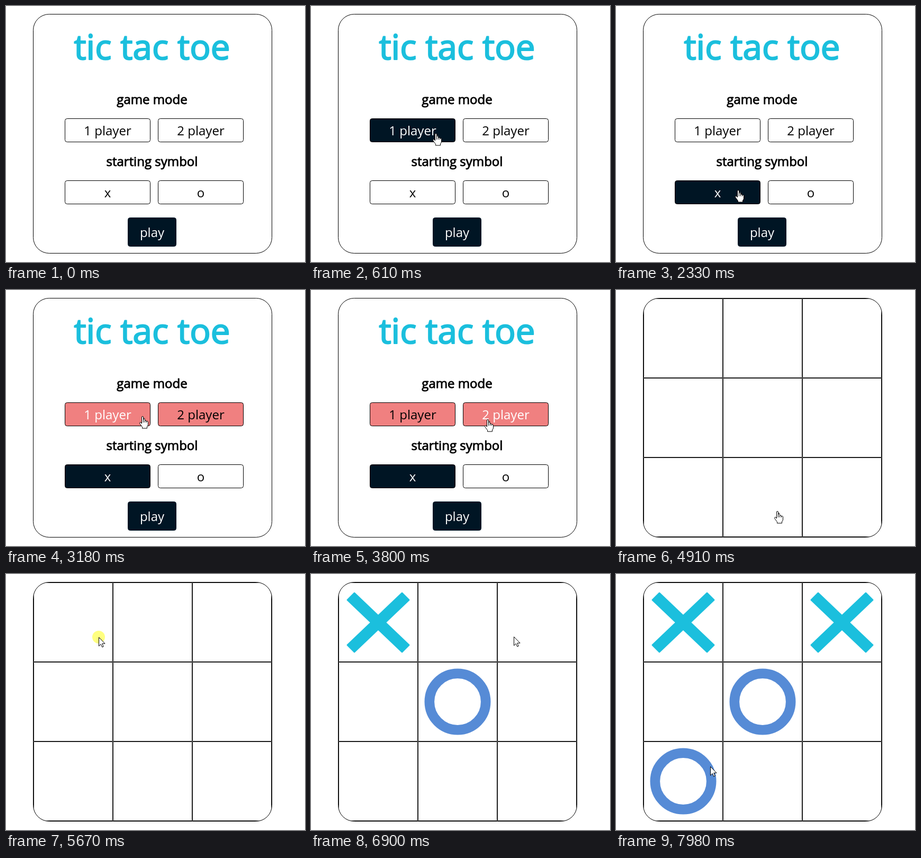
Write an HTML page with a canvas that moves like this. It is 565 px wide and 483 px high and loops after 8000 ms.

```html
<!DOCTYPE html>
<html lang="en">
<head>
<meta charset="utf-8">
<title>tic tac toe</title>
<style>
  html, body { margin: 0; width: 100%; height: 100%; overflow: hidden; background: #fff; }
  canvas { display: block; }
</style>
</head>
<body>
<canvas id="stage" width="565" height="483"></canvas>
<script>
const ctx = document.getElementById('stage').getContext('2d');
const LOOP = 8000, TICK = 76, PRESS = 150;
const CYAN = '#1bbfdd', BLUE = '#568bd6', DARK = '#001524', CORAL = '#f08080';
const FONT = '"Open Sans", sans-serif';
const LEFT = 52, TOP = 16, CELL = 150;

// Pointer script: each move leads on from the one before, some end in a click
const moves = [];
const move = (start, end, x, y) => moves.push({ start, end, x, y });
const click = (start, end, x, y) => {
  move(start, end, x, y);
  return end + PRESS;
};

move(0, 1, 545, 500);
move(150, 610, 236, 240);
const pickX = click(1540, 1860, 231, 347);
const refuse = click(2340, 2560, 290, 420);
move(refuse, 2950, 255, 267);
move(3020, 3180, 258, 238);
move(3250, 3880, 337, 244);
const pickTwo = 4200;
move(pickTwo, 4430, 337, 295);
const begin = click(4430, 4760, 305, 417);

// Turns alternate between X and O
const turns = [];
const turn = (cell, ...to) => turns.push({ cell, time: click(...to) });
turn(0, 5140, 5670, 175, 119);
turn(4, 5990, 6360, 280, 238);
move(6760, 6900, 378, 114);
turn(2, 6900, 7060, 396, 131);
turn(6, 7360, 7830, 178, 363);

const presses = [pickX, refuse, begin, ...turns.map(m => m.time)];

const option = (col, row) => [111 + 176 * col, 212 + 117 * row, 162, 45];
const buttons = {
  one: option(0, 0), two: option(1, 0),
  x: option(0, 1), o: option(1, 1),
  play: [230, 399, 92, 55]
};
const labels = [165, 281].map(y => [190, y, 172, 26]);

const inside = (p, [x, y, w, h]) => p.x >= x && p.x < x + w && p.y >= y && p.y < y + h;
const ease = k => k * k * (3 - 2 * k);

function pointerAt(t) {
  let i = moves.length - 1;
  while (i > 0 && moves[i].start > t) i--;
  const to = moves[i], from = moves[i - 1] || to;
  const span = to.end - to.start;
  const n = Math.max(1, Math.round(span / TICK));
  const step = Math.floor((t - to.start) / span * n + 0.01);
  const k = ease(Math.min(1, (step + 1) / (n + 1)));
  return {
    x: Math.round(from.x + (to.x - from.x) * k),
    y: Math.round(from.y + (to.y - from.y) * k)
  };
}

function roundRect(x, y, w, h, r) {
  ctx.beginPath();
  ctx.roundRect(x, y, w, h, r);
}

function text(str, x, y, size, color, bold = 0) {
  ctx.font = `400 ${size}px ${FONT}`;
  ctx.textAlign = 'center';
  ctx.fillStyle = ctx.strokeStyle = color;
  ctx.fillText(str, x, y);
  if (bold) {
    ctx.lineWidth = bold;
    ctx.lineJoin = 'round';
    ctx.strokeText(str, x, y);
  }
}

function button([x, y, w, h], str, fill, color, edge = '#000') {
  roundRect(x + 0.5, y + 0.5, w - 1, h - 1, 4);
  ctx.fillStyle = fill;
  ctx.fill();
  ctx.strokeStyle = edge;
  ctx.lineWidth = 1;
  ctx.stroke();
  text(str, x + w / 2, y + h / 2 + 9.5, 24, color);
}

function frame() {
  roundRect(LEFT - 0.5, TOP - 0.5, 3 * CELL + 1, 3 * CELL + 1, 30);
  ctx.strokeStyle = '#000';
  ctx.lineWidth = 1;
  ctx.stroke();
}

function drawMenu(t, p) {
  frame();
  text('tic tac toe', 276, 100.5, 65.5, CYAN, 2.2);
  text('game mode', 276, 185, 24, '#000', 0.9);
  text('starting symbol', 276, 302, 24, '#000', 0.9);

  const choice = (key, str, picked, error) => {
    const lit = picked || inside(p, buttons[key]);
    const fill = error && !picked ? CORAL : lit ? DARK : '#fff';
    button(buttons[key], str, fill, lit ? '#fff' : '#000');
  };
  const error = t >= refuse;
  choice('one', '1 player', false, error);
  choice('two', '2 player', t >= pickTwo, error);
  choice('x', 'x', t >= pickX, false);
  choice('o', 'o', false, false);

  const hot = inside(p, buttons.play);
  button(buttons.play, 'play', hot ? '#fff' : DARK, hot ? DARK : '#fff', DARK);
}

function drawX(cx, cy) {
  ctx.fillStyle = ctx.strokeStyle = CYAN;
  ctx.lineWidth = 3;
  ctx.lineJoin = 'round';
  for (const s of [1, -1]) {
    ctx.beginPath();
    ctx.moveTo(cx - s * 45, cy - 55.4);
    ctx.lineTo(cx + s * 58, cy + 42.5);
    ctx.lineTo(cx + s * 45, cy + 55.4);
    ctx.lineTo(cx - s * 58, cy - 42.5);
    ctx.closePath();
    ctx.fill();
    ctx.stroke();
  }
}

function drawO(cx, cy) {
  ctx.beginPath();
  ctx.arc(cx, cy, 53.2, 0, Math.PI * 2);
  ctx.strokeStyle = BLUE;
  ctx.lineWidth = 18.6;
  ctx.stroke();
}

function drawBoard(t) {
  const col = i => LEFT + (i % 3) * CELL;
  const row = i => TOP + Math.floor(i / 3) * CELL;
  ctx.save();
  roundRect(LEFT, TOP, 3 * CELL, 3 * CELL, 29.5);
  ctx.clip();
  ctx.strokeStyle = '#1c1c1c';
  ctx.lineWidth = 1;
  for (let i = 0; i < 9; i++) ctx.strokeRect(col(i) + 0.5, row(i) + 0.5, CELL - 1, CELL - 1);
  ctx.restore();
  frame();
  turns.forEach(({ cell, time }, i) => {
    if (t < time) return;
    const mark = i % 2 ? drawO : drawX;
    mark(col(cell) + CELL / 2, row(cell) + CELL / 2 + (i % 2 ? 0 : 0.5));
  });
}

const arrow = new Path2D('M.5.5V17L4.2 13.4L6.8 19L9.2 18L6.8 12.3H12Z');
const hand = new Path2D(
  'M-1.5 12V2Q-1.5.5 0 .5T1.5 2V8Q3-.5 4.5 7.5V9Q6 7 7.5 9V10Q10 8.5 10.5 11V16' +
  'Q10.5 18 8.5 20V23H-.5V20.5L-5 14.5Q-6 12.5-4.5 11.5Q-3 11-1.5 14Z');
const fingers = new Path2D('M1.5 8V12M4.5 8.5V12M7.5 9.5V12');
const beam = new Path2D('M-3.5-7.5H-1L0-6.5L1-7.5H3.5M-3.5 7.5H-1L0 6.5L1 7.5H3.5M0-6.5V6.5');

function drawPointer(t, p) {
  ctx.save();
  ctx.translate(p.x, p.y);
  ctx.lineJoin = 'round';
  const menu = t < begin + TICK;
  if (menu && labels.some(b => inside(p, b))) {
    ctx.strokeStyle = '#fff';
    ctx.lineWidth = 2.4;
    ctx.stroke(beam);
    ctx.strokeStyle = '#222';
    ctx.lineWidth = 1;
    ctx.stroke(beam);
  } else {
    const over = menu && Object.values(buttons).some(b => inside(p, b));
    const shape = over ? hand : arrow;
    ctx.fillStyle = '#fff';
    ctx.strokeStyle = '#000';
    ctx.lineWidth = 1;
    ctx.fill(shape);
    ctx.stroke(shape);
    if (over) ctx.stroke(fingers);
  }
  ctx.restore();
}

function draw(t) {
  const p = pointerAt(t);
  ctx.fillStyle = '#fff';
  ctx.fillRect(0, 0, 565, 483);
  if (t < begin) drawMenu(t, p);
  else drawBoard(t);
  if (presses.some(end => t >= end - PRESS && t < end)) {
    ctx.fillStyle = 'rgba(255,255,0,.5)';
    ctx.beginPath();
    ctx.arc(p.x, p.y, 12, 0, Math.PI * 2);
    ctx.fill();
  }
  drawPointer(t, p);
}

const origin = performance.now();
function tick() {
  draw((performance.now() - origin) % LOOP);
  requestAnimationFrame(tick);
}
tick();
</script>
</body>
</html>
```
